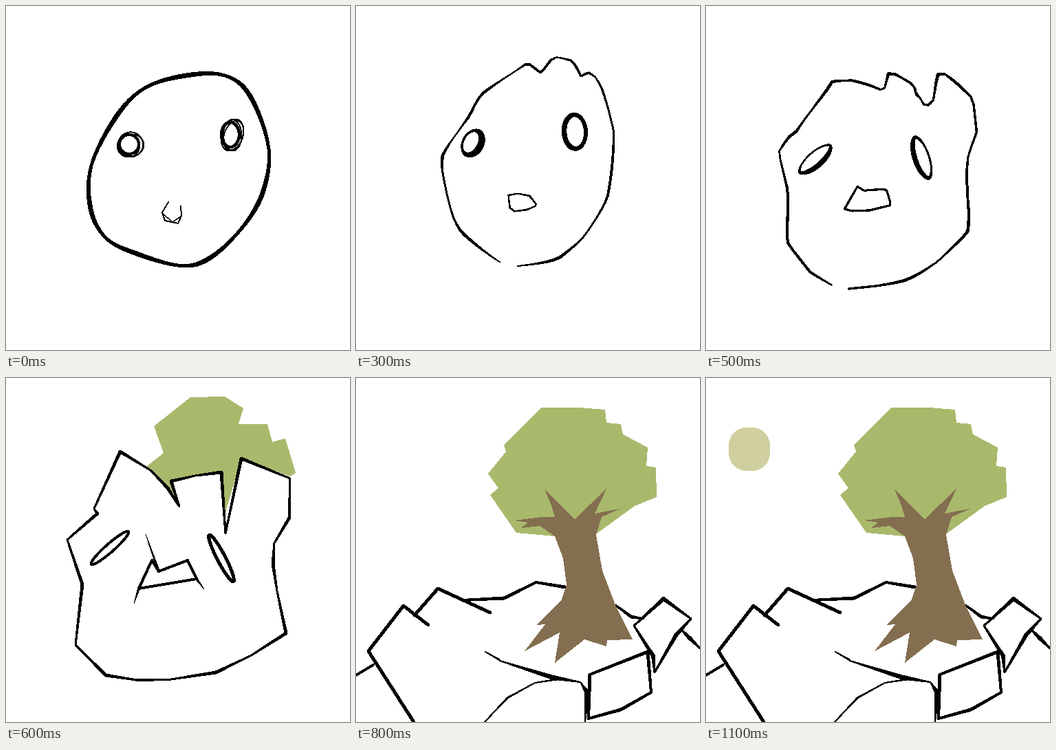
These frames come from a looping animation (500x500 px, 1500 ms). An HTML page:

```html
<!DOCTYPE html>
<html lang="en">
<head>
<meta charset="utf-8">
<title>Face to landscape</title>
<style>
html, body { margin: 0; height: 100%; overflow: hidden; background: #fff; }
svg { display: block; width: 100%; height: 100%; }
</style>
</head>
<body>
<svg id="stage" viewBox="0 0 500 500" shape-rendering="crispEdges"></svg>
<script>
const GREEN = '#a9b96c', BROWN = '#846e50', SUN = '#d0cf9f';
const STEP = 100, LOOP = 1500;

let seed = 7;
const random = () => (seed = seed * 16807 % 2147483647) / 2147483647;
const spread = size => (random() - 0.5) * size;
const mix = (a, b, f) => a.map((v, i) => v + (b[i] - v) * f);

// A stroke is a list of [x, y, width]; a pen line presses lightly and firmly in turn.
const pen = (thin, thick, ...xy) => Array.from({ length: xy.length / 2 },
  (_, i) => [xy[2 * i], xy[2 * i + 1], i % 2 ? thick : thin]);

// Tilted ellipse, with dw more width on its right side and less on its left.
const ring = (cx, cy, rx, ry, w, dw = 0, tilt = 0) => Array.from({ length: 37 }, (_, i) => {
  const a = i / 18 * Math.PI, x = rx * Math.cos(a), y = ry * Math.sin(a);
  const c = Math.cos(tilt), s = Math.sin(tilt);
  return [cx + x * c - y * s, cy + x * s + y * c, Math.max(1.2, w + dw * Math.cos(a))];
});

// Loose thin rings around an eye.
const scribble = (cx, cy, rx, ry) => Array.from({ length: 3 }, () =>
  ring(cx + spread(6), cy + spread(4), rx + spread(4), ry + spread(4), 2, 0, spread(0.8)));

// Closed Catmull-Rom curve through the points.
function smooth(points) {
  const n = points.length, parts = 6;
  return Array.from({ length: n * parts + 1 }, (_, j) => {
    const i = Math.floor(j / parts), t = j % parts / parts;
    const [a, b, c, d] = [n - 1, 0, 1, 2].map(k => points[(i + k) % n]);
    return b.map((v, k) => v + t / 2 * (c[k] - a[k] +
      t * (2 * a[k] - 5 * v + 4 * c[k] - d[k] + t * (3 * (v - c[k]) + d[k] - a[k]))));
  });
}

// Evenly spaced points along a stroke.
function resample(points, count = 90) {
  const at = [0];
  points.slice(1).forEach(([x, y], i) => at.push(at[i] + Math.hypot(x - points[i][0], y - points[i][1])));
  let k = 1;
  return Array.from({ length: count }, (_, i) => {
    const s = i / (count - 1) * at.at(-1);
    while (k < at.length - 1 && at[k] < s) k++;
    return mix(points[k - 1], points[k], (s - at[k - 1]) / (at[k] - at[k - 1] || 1));
  });
}

// Halfway pose of head, eyes and mouth.
const between = (a, b) => a.slice(0, 4).map((s, i) => {
  const to = resample(b[i]);
  return resample(s).map((p, j) => mix(p, to[j], 0.5));
});

// Outline of a stroke: a disc at each point and a tapered bar to the next.
const brush = points => points.map(([x, y, w], i) => {
  const r = w / 2, [u, v, q] = points[i + 1] || points[i], len = Math.hypot(u - x, v - y) || 1;
  const nx = (y - v) / len, ny = (u - x) / len, e = q / 2;
  return `M${x - r} ${y}a${r} ${r} 0 0 0 ${w} 0a${r} ${r} 0 0 0 ${-w} 0Z` +
    `M${x + nx * r} ${y + ny * r}L${u + nx * e} ${v + ny * e}` +
    `L${u - nx * e} ${v - ny * e}L${x - nx * r} ${y - ny * r}Z`;
}).join('');

const ink = strokes => `<path d="${strokes.map(brush).join('')}"/>`;
const shape = (fill, ...xy) => `<polygon fill="${fill}" points="${xy.join(' ')}"/>`;

// Faces start with head, left eye, right eye and mouth.
const round = [
  smooth(pen(5, 7, 250,377, 190,360, 146,338, 123,295, 124,232, 160,161, 202,119,
    262,101, 318,101, 355,131, 382,208, 371,277, 335,332, 290,370)),
  ring(179, 201, 14, 14, 4),
  ring(326, 187, 13, 18, 4.5),
  pen(2, 2, 236,285, 227,300, 231,312, 250,316, 255,305, 254,291),
  pen(1.5, 1.5, 228,302, 242,314, 254,306),
  ...scribble(181, 202, 17, 17),
  ...scribble(328, 187, 15, 22)
];

const sketch = [
  smooth(pen(2, 4.5, 244,373, 190,366, 150,344, 125,272, 127,230, 145,177, 185,137,
    240,97, 285,86, 320,97, 361,147, 376,232, 357,309, 300,364)),
  ring(171, 199.5, 14.5, 18.5, 7.5, 2),
  ring(321.5, 186.5, 16.5, 23.5, 8, 3),
  pen(2, 3, 215,290, 245,304, 272,291, 243,288, 215,290),
  pen(1, 1, 223,365, 250,365)
];

const spiky = [
  pen(2, 5, 175,372, 134,298, 122,190, 125,169, 165,142, 195,120, 209,95, 216,86, 270,58,
    294,45, 294,101, 297,70, 303,62, 328,72, 330,105, 332,74, 345,78, 354,92, 375,164,
    364,270, 325,338, 290,369, 226,383),
  ring(166, 198, 14, 23, 5, 6, 0.85),
  ring(315, 179, 15, 26, 5, -5, -0.1),
  pen(2, 3, 228,260, 209,285, 215,293, 235,296, 262,286, 261,264, 243,256, 228,260)
];

const crag = [
  pen(3, 5, 190,439, 145,432, 101,388, 111,300, 89,235, 133,197, 128,190, 166,107, 210,134,
    235,160, 252,187, 240,150, 275,142, 313,137, 319,226, 342,117, 413,146, 412,203, 390,240,
    388,270, 394,310, 407,371, 355,404, 305,428, 240,438, 190,439),
  ring(151, 247, 6, 36, 4, 0, 0.85),
  ring(313, 262, 6, 38, 5, 0, -0.48),
  pen(4, 4, 212,265, 193,306, 277,292, 264,265, 222,281, 212,265),
  pen(1, 4, 203,227, 222,281),
  pen(1, 4, 186,328, 193,306),
  pen(1, 4, 288,307, 277,292)
];

const peaks = [
  pen(4, 6, 0,492, 45,445, 75,380, 69,366, 92,330, 80,309, 125,240, 187,176, 245,270, 265,305, 289,368),
  pen(1, 5, 55,471, 45,445),
  pen(3, 5, 246,274, 274,241, 284,273),
  pen(4, 6, 258,290, 300,266, 374,235, 376,272, 421,201, 460,253, 442,310, 443,355, 460,400, 500,476),
  pen(2, 6, 441,442, 458,405),
  ring(142, 365, 5, 46, 5, 0, 0.68),
  ring(357, 328, 1, 42, 4, 0, -0.63),
  pen(3, 5, 178,495, 215,466, 219,425, 228,467, 277,453, 290,492, 235,486, 178,495)
];

const rocks = [
  pen(5, 5, 84,500, 18,397, 69,331, 105,359),
  pen(5, 5, 85,345, 119,306, 195,341),
  pen(4, 5, 155,323, 215,320, 262,297, 304,304),
  pen(3, 5, 377,330, 400,347, 418,350),
  pen(4, 4, 0,432, 25,417),
  pen(3, 6, 434,428, 432,404, 404,360, 447,321, 487,350, 465,374, 434,428),
  pen(4, 5, 340,431, 424,398, 429,457, 385,482, 338,495, 340,431),
  pen(2, 3, 188,398, 209,410),
  pen(2, 7, 209,411, 285,435, 326,442, 336,457, 333,500),
  pen(2, 3, 187,500, 220,465, 260,443, 300,437),
  pen(3, 6, 472,365, 485,378, 500,393)
];

const sprout = shape(GREEN, 205,128, 229,109, 215,70, 268,28, 318,27, 345,44, 338,67, 380,67,
  387,93, 406,88, 421,138, 413,143, 342,117, 319,195, 313,136, 240,150, 246,176);

const crown = (...low) => shape(GREEN, 207,160, 192,139, 218,107, 215,97, 269,43, 325,43, 362,46,
  364,65, 385,67, 388,82, 424,101, 422,128, 436,130, 437,173, ...low);

const trunk = (left, right) => shape(BROWN, 274,162, 318,205, 364,161, 347,197, ...right, 349,228,
  358,280, 377,330, 402,380, 365,381, 364,390, 332,380, 289,414, 296,370, 245,397, 275,358,
  262,359, 299,322, 306,300, 301,262, 289,230, 267,215, 240,218, 250,210, 230,207, 270,202, ...left);

const slopes = shape('#fff', 187,176, 245,273, 262,292, 300,266, 374,235, 376,272, 421,201,
  460,253, 500,476, 500,500, 0,500);

const hill = ink(rocks) + crown(405,186, 350,226, 289,230, 233,225, 195,170) +
  trunk([289,202, 284,185], [384,190, 357,202]);
const sun = drop => `<rect x="33" y="${72 + drop}" width="60" height="63" rx="26" fill="${SUN}"/>`;

const poses = [
  ink(round),
  ink(between(round, sketch)),
  ink(sketch),
  ink(between(sketch, spiky)),
  ink(spiky),
  ink(between(spiky, crag)),
  sprout + ink(crag),
  crown(392,189, 358,206, 350,225, 217,219, 188,177) + trunk([302,204], [392,188, 360,203]) +
    slopes + ink(peaks),
  hill,
  sun(140) + hill,
  sun(60) + hill,
  sun(0) + hill
];

const stage = document.getElementById('stage');
const start = performance.now();
let shown = -1;

function tick() {
  const time = (performance.now() - start) % LOOP;
  const pose = Math.min(Math.floor(time / STEP), poses.length - 1);
  if (pose !== shown) stage.innerHTML = poses[shown = pose];
  requestAnimationFrame(tick);
}
tick();
</script>
</body>
</html>
```
